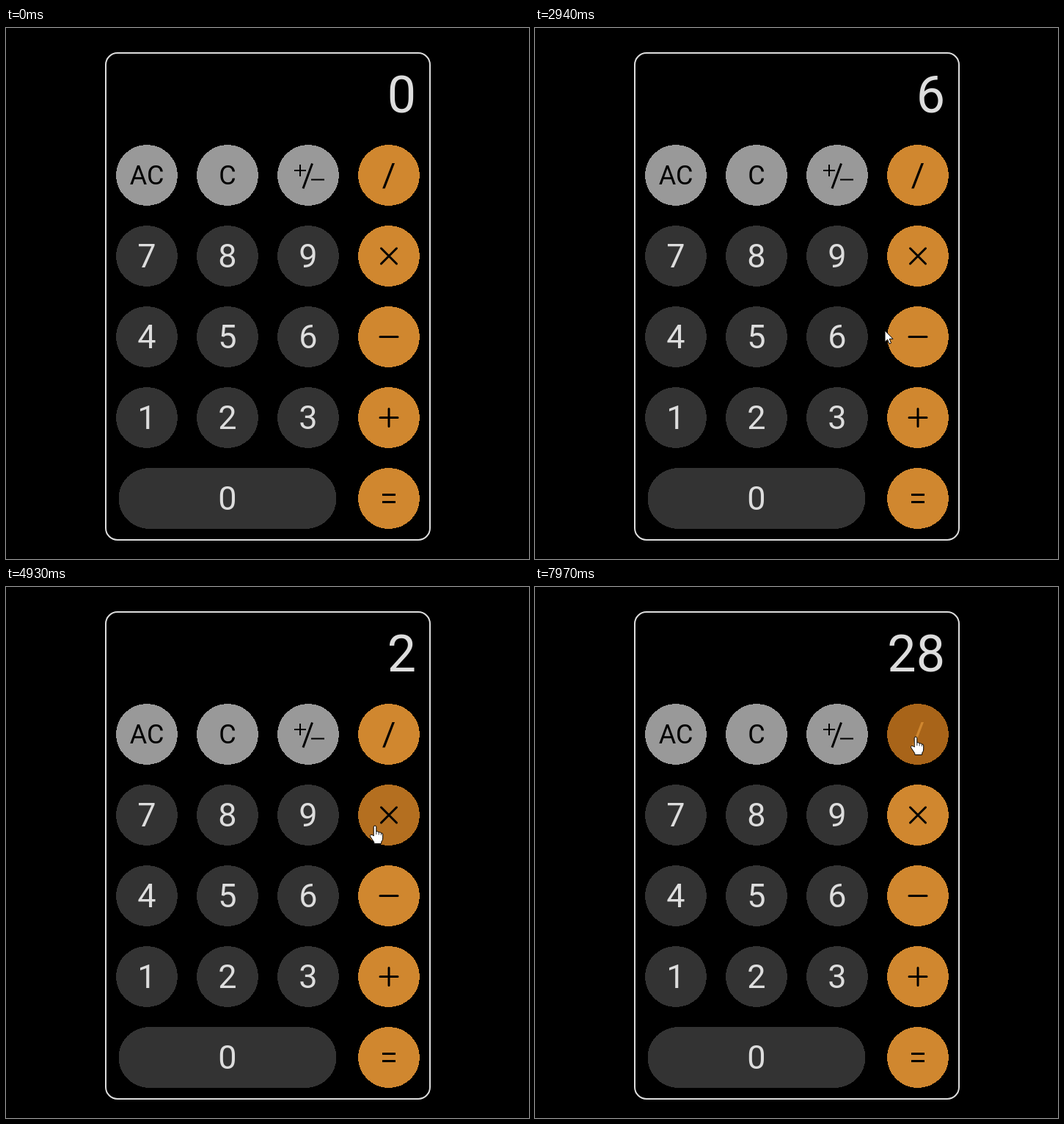
An HTML page that plays this animation: 713 px wide and 723 px high, repeating every 8 s.

```html
<!DOCTYPE html>
<html lang="en">
<head>
<meta charset="utf-8">
<title>Calculator</title>
<style>
  html, body { margin: 0; width: 100%; height: 100%; overflow: hidden; background: #000; }
  svg { display: block; width: 713px; height: 723px; font-family: Roboto, Arial, sans-serif; }
  .face { shape-rendering: crispEdges; }
  .icon { fill: none; stroke-width: 3; }
</style>
</head>
<body>
<svg viewBox="0 0 713 723">
  <rect width="713" height="723"/>
  <rect x="136" y="34" width="442" height="663" rx="16" fill="none" stroke="#ddd" stroke-width="2"/>
  <text id="display" x="559" y="115" font-size="70" text-anchor="end" fill="#ddd"></text>
  <g id="keys"></g>
  <g id="cursor" fill="#fff" stroke="#000" stroke-linejoin="round">
    <path id="arrow" d="M0 0V15.5L3.6 12.2 6 18 8.6 16.9 6.2 11.3H11Z"/>
    <g id="hand">
      <path d="M-1.8 14V1.8a1.8 1.8 0 0 1 3.6 0V8q2-1 3.4 1 2-.8 3.2 1 2.3-.4 2.3 2v5q0 3-2 5v2.5H-1.2v-2l-5-7.5q-.9-2 .8-2.8 1.6-.4 3.6 1.8z"/>
      <path d="M1.8 8v4M5.2 9v3.5M8.4 10v3" fill="none" stroke-width=".8"/>
    </g>
  </g>
</svg>
<script>
const LOOP = 8000, FADE = 200, SAMPLES = 20;
const START = 350, STEP = 77.6;
const RADIUS = 42, PITCH = 110;
const BLACK = [0, 0, 0], ORANGE = [208, 135, 47], WHITE = [237, 236, 234];
const SKINS = {
  digit: { base: [51, 51, 51], hover: [41, 41, 41], ink: '#ddd' },
  func: { base: [153, 153, 153], hover: [122, 122, 122], ink: '#000' },
  op: { base: ORANGE, hover: [168, 100, 25], ink: '#000' }
};
const ICONS = {
  '×': 'M-10.5-10.5 10.5 10.5M10.5-10.5-10.5 10.5',
  '−': 'M-12 0H12',
  '+': 'M-12 0H12M0-12V12',
  '=': 'M-9-5H9M-9 5H9'
};
const ROWS = ['AC C ± /', '7 8 9 ×', '4 5 6 −', '1 2 3 +', '0 ='].map(row => row.split(' '));
const OPERATIONS = {
  '+': (a, b) => a + b,
  '−': (a, b) => a - b,
  '×': (a, b) => a * b,
  '/': (a, b) => a / b
};
const PRESSES = [
  [1525, '3'], [2060, '+'], [2605, '6'], [3465, '−'],
  [4400, '2'], [5325, '×'], [6700, '4'], [7730, '/']
];

// Pointer moves: each curves from where the last one ended
const ENTRY = { x: 644, y: 689 };
const MOVES = [
  { start: 360, end: 760, x: 520, y: 532 },
  { start: 1075, end: 1355, x: 428, y: 503, bow: 0.4 },
  { start: 1600, end: 1990, x: 514, y: 522 },
  { start: 2080, end: 2400, x: 410, y: 404 },
  { start: 2620, end: 3100, x: 506, y: 416 },
  { start: 3360, end: 4090, x: 316, y: 522, bow: 0.36 },
  { start: 4330, end: 4945, x: 503, y: 325, bow: -0.18 },
  { start: 5000, end: 5110, x: 504, y: 292 },
  { start: 6010, end: 6560, x: 195, y: 414, bow: 0.16 },
  { start: 6615, end: 7375, x: 519, y: 204, bow: -0.47 }
];

const $ = id => document.getElementById(id);
const rgb = c => `rgb(${c.map(Math.round)})`;
const smooth = p => p * p * (3 - 2 * p);
const easeOut = p => 1 - (1 - p) ** 2;

function add(parent, tag, attrs, text) {
  const el = document.createElementNS('http://www.w3.org/2000/svg', tag);
  for (const name in attrs) el.setAttribute(name, attrs[name]);
  if (text) el.textContent = text;
  return parent.appendChild(el);
}

function makeMark(label, x, y, ink) {
  const icon = { class: 'icon', stroke: ink, transform: `translate(${x} ${y})` };
  if (ICONS[label]) {
    const cap = label === '=' ? 'butt' : 'round';
    return add($('keys'), 'path', { ...icon, d: ICONS[label], 'stroke-linecap': cap });
  }
  if (label === '±') {
    const g = add($('keys'), 'g', icon);
    add(g, 'path', { d: 'M-19-6.5H-3M-11-14.5V1.5M4 6H22', 'stroke-width': 2 });
    add(g, 'path', { d: 'M5.5-16-7 18' });
    return g;
  }
  const size = /[AC]/.test(label) ? 36 : 45;
  const attrs = { x, y: y + size * 0.35, 'font-size': size, 'text-anchor': 'middle', fill: ink };
  return add($('keys'), 'text', attrs, label);
}

function makeKey(label, row, col) {
  const wide = label === '0';
  const skin = SKINS[col === 3 ? 'op' : row === 0 ? 'func' : 'digit'];
  const x = 192 + (wide ? 1 : col) * PITCH, y = 200.5 + row * PITCH;
  const half = wide ? 148.5 : RADIUS;
  const face = add($('keys'), 'rect', {
    class: 'face', x: x - half, y: y - 41.5, width: half * 2, height: 83, rx: Math.min(half, RADIUS), ry: 41.5
  });
  return { label, x, y, skin, face, reach: half - RADIUS, mark: makeMark(label, x, y, skin.ink) };
}

const keys = ROWS.flatMap((row, r) => row.map((label, c) => makeKey(label, r, label === '=' ? 3 : c)));

function pointer(t) {
  const i = MOVES.filter(move => move.start <= t).length - 1;
  if (i < 0) return null;
  const from = MOVES[i - 1] || ENTRY, to = MOVES[i];
  const u = smooth(Math.min(1, (t - to.start) / (to.end - to.start)));
  const dx = to.x - from.x, dy = to.y - from.y;
  const bend = 2 * u * (1 - u) * (to.bow || 0);
  return { x: from.x + dx * u + dy * bend, y: from.y + dy * u - dx * bend };
}

function isOver(key, point) {
  if (!point) return false;
  const dx = Math.max(0, Math.abs(point.x - key.x) - key.reach);
  return Math.hypot(dx, point.y - key.y) < RADIUS;
}

function calculate(t) {
  let shown = 0, stored = 0, pending = null, lit = null;
  for (const [at, label] of PRESSES) {
    if (at > t) break;
    if (OPERATIONS[label]) {
      if (pending) shown = OPERATIONS[pending](stored, shown);
      stored = shown;
      pending = lit = label;
    } else {
      shown = Number(label);
      lit = null;
    }
  }
  return { shown, lit };
}

// Eased fade: a weighted mean of the colours wanted over the last moments
function fade(history, wanted) {
  const mix = [0, 0, 0];
  for (const moment of history) {
    wanted(moment).forEach((v, i) => { mix[i] += v * moment.weight; });
  }
  return rgb(mix);
}

function recall(t) {
  return Array.from({ length: SAMPLES }, (_, i) => {
    const past = t - (i + 0.5) / SAMPLES * FADE;
    const weight = easeOut((i + 1) / SAMPLES) - easeOut(i / SAMPLES);
    return { point: pointer(past), lit: calculate(past).lit, weight };
  });
}

function drawKey(key, history) {
  const { label, skin, face, mark } = key;
  face.setAttribute('fill', fade(history, ({ point, lit }) =>
    isOver(key, point) ? skin.hover : lit === label ? WHITE : skin.base));
  if (OPERATIONS[label]) {
    mark.setAttribute(ICONS[label] ? 'stroke' : 'fill', fade(history, ({ lit }) => lit === label ? ORANGE : BLACK));
  }
}

function drawCursor(point) {
  $('cursor').setAttribute('visibility', point ? 'visible' : 'hidden');
  if (!point) return;
  const over = keys.some(key => isOver(key, point));
  $('cursor').setAttribute('transform', `translate(${Math.round(point.x)} ${Math.round(point.y)})`);
  $('hand').setAttribute('display', over ? 'inline' : 'none');
  $('arrow').setAttribute('display', over ? 'none' : 'inline');
}

function render(now) {
  const t = now < START ? 0 : START + Math.floor((now - START) / STEP) * STEP + 14;
  const history = recall(t);
  keys.forEach(key => drawKey(key, history));
  $('display').textContent = calculate(t).shown;
  drawCursor(pointer(t));
}

const begin = performance.now();
function tick() {
  render((performance.now() - begin) % LOOP);
  requestAnimationFrame(tick);
}
tick();
</script>
</body>
</html>
```
